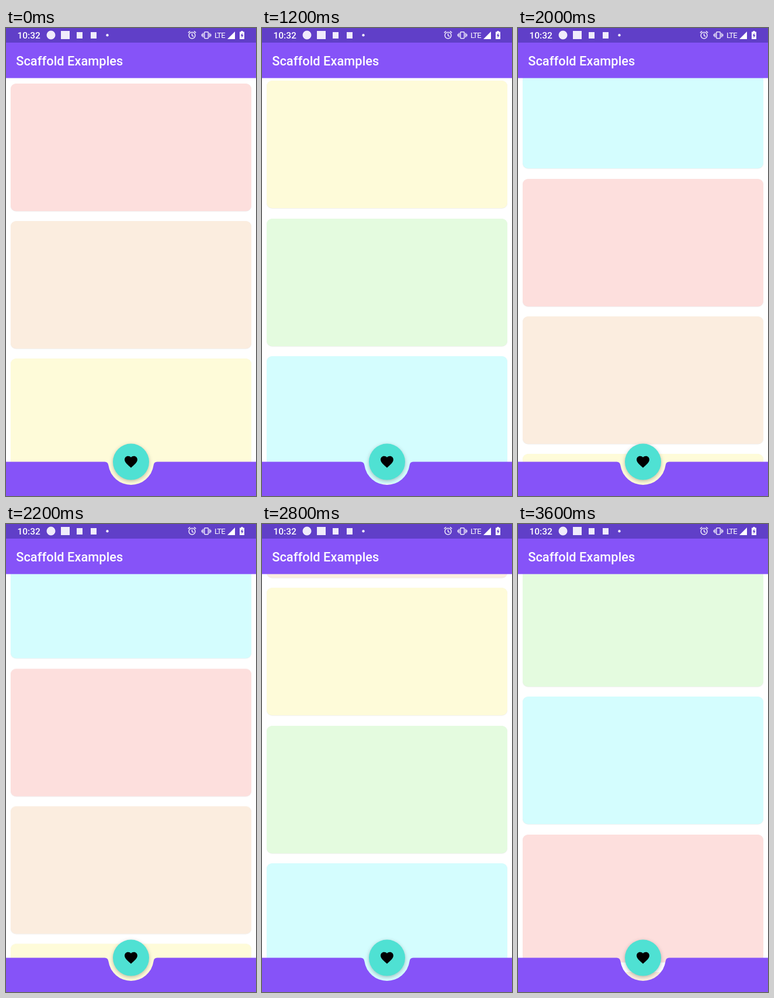
Write an HTML page that moves like this. It is 428 by 800 pixels and loops after 3700 ms.

```html
<!DOCTYPE html>
<html lang="en">
<head>
<meta charset="utf-8">
<title>Scaffold Examples</title>
<style>
  html, body { margin: 0; width: 100%; height: 100%; overflow: hidden; background: #fff; }
  #stage { position: relative; width: 428px; height: 800px; overflow: hidden; background: #fff; }
  #list { position: absolute; left: 0; top: 0; width: 100%; will-change: transform; }
  .card {
    position: absolute; left: 8px; width: 411.5px; height: 218px;
    border-radius: 9px; box-shadow: 0 .5px 1px rgba(0, 0, 0, .1);
  }
  svg { position: absolute; left: 0; top: 0; }
  text { font-family: Roboto, sans-serif; fill: #fff; }
  #fab { filter: drop-shadow(0 2px 3px rgba(0, 0, 0, .25)); }
</style>
</head>
<body>
<div id="stage">
  <div id="list"></div>
  <svg width="428" height="800" viewBox="0 0 428 800">
    <rect width="428" height="85.600" fill="#8653f8"/>
    <rect width="428" height="25" fill="#603fc8"/>
    <text x="17.200" y="64.300" font-size="21.800" font-weight="500" letter-spacing=".04">Scaffold Examples</text>

    <!-- status bar, left -->
    <text x="19.500" y="18" font-size="15.500" font-weight="500">10:32</text>
    <g fill="#f0ecfb">
      <circle cx="77" cy="12" r="7.500"/>
      <rect x="94" y="5" width="15" height="14"/>
      <rect x="121" y="7" width="10" height="11"/>
      <rect x="145" y="7" width="10" height="11"/>
      <circle cx="173.500" cy="12.300" r="2.200"/>
    </g>

    <!-- status bar, right -->
    <g fill="none" stroke="#f0ecfb" stroke-width="1.500">
      <circle cx="318.500" cy="12.600" r="5.400"/>
      <path d="M318.500 9.300V12.800l2.600 1.700M311.800 8.100l3.400-2.900M325.200 8.100l-3.400-2.900"/>
      <rect x="339.700" y="6.800" width="6.600" height="11" rx="1"/>
      <path d="M337.400 8.500v7.500M348.600 8.500v7.500M335.400 10.300v4M350.600 10.300v4"/>
    </g>
    <text x="357" y="17" font-size="13" letter-spacing="-.9">LTE</text>
    <path d="M379 19L392 6V19Z" fill="#fff"/>
    <path d="M402.500 5h3v1.600h2.500V19h-8V6.600h2.500Z" fill="#fff"/>
    <path d="M404.700 8.500L401.600 13.300h1.900v3.700l3-5h-1.800Z" fill="#603fc8"/>

    <!-- bottom bar with cradle -->
    <path fill="#8653f8" d="M0 741.500H169Q174.500 741.500 175.400 747.500A39 39 0 0 0 252.600 747.500Q253.500 741.500 259 741.500H428V800H0Z"/>
    <circle id="fab" cx="214" cy="741.600" r="31" fill="#4fe1d3"/>
    <path transform="translate(200.900 728.500) scale(1.09)" d="M12 21.350l-1.450-1.320C5.400 15.360 2 12.280 2 8.500 2 5.420 4.420 3 7.500 3c1.740 0 3.410.81 4.500 2.090C13.090 3.810 14.760 3 16.500 3 19.580 3 22 5.420 22 8.500c0 3.780-3.400 6.860-8.550 11.540L12 21.350z"/>
  </svg>
</div>
<script>
  const LOOP = 3700, STEP = 100, TOP = 94.5, PITCH = 235.4;
  const COLORS = ['#fddfdd', '#fbeddf', '#fefbd9', '#e4fbdf', '#d4fdfe'];
  // [time ms, scroll px, velocity px/ms]
  const KEYS = [
    [0, 0, 0], [400, 0, 0], [1200, 475, 1.1], [1600, 923, .6], [2000, 1014, 0],
    [2400, 945, -.9], [2800, 456, -1.2], [3150, 0, 0], [3600, 741, .5]
  ];

  const list = document.getElementById('list');
  for (let i = 0; i < 9; i++) {
    const card = document.createElement('div');
    card.className = 'card';
    card.style.top = TOP + i * PITCH + 'px';
    card.style.background = COLORS[i % COLORS.length];
    list.append(card);
  }

  // Cubic Hermite curve through the keys
  function scrollAt(t) {
    const i = Math.max(1, KEYS.findIndex(k => k[0] >= t));
    const [t0, p0, v0] = KEYS[i - 1], [t1, p1, v1] = KEYS[i];
    const d = t1 - t0, u = (t - t0) / d, w = 1 - u;
    return p0 * w * w * (1 + 2 * u) + p1 * u * u * (3 - 2 * u)
      + d * u * w * (v0 * w - v1 * u);
  }

  const start = performance.now();
  function draw() {
    const t = (performance.now() - start) % LOOP;
    const y = scrollAt(Math.floor(t / STEP) * STEP);
    list.style.transform = `translateY(${-y}px)`;
    requestAnimationFrame(draw);
  }
  draw();
</script>
</body>
</html>
```
